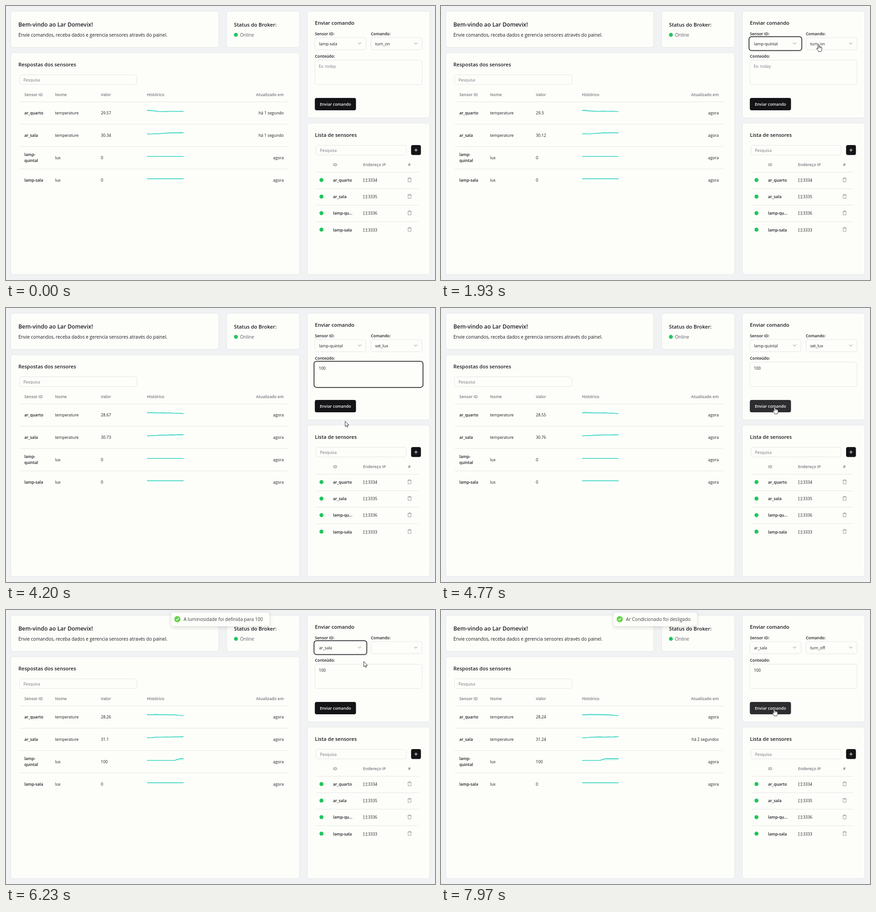
Recreate the animation shown at these times as an HTML page with a canvas. Size 936 by 599 pixels, loop 8000 ms.

```html
<!DOCTYPE html>
<html lang="pt-BR">
<head>
<meta charset="utf-8">
<title>Painel de sensores</title>
<style>
  html, body { margin: 0; width: 100%; height: 100%; overflow: hidden; background: #f0f2f3; }
  canvas { display: block; width: 936px; height: 599px; }
</style>
</head>
<body>
<canvas id="stage"></canvas>
<script>
const W = 936, H = 599, LOOP = 8000;
const canvas = document.getElementById('stage');
const ctx = canvas.getContext('2d');
const ratio = window.devicePixelRatio || 1;
canvas.width = W * ratio;
canvas.height = H * ratio;

const FONT = '"Open Sans", "Noto Sans", sans-serif';
const INK = '#1b1b1f', GRAY = '#74747c', LINE = '#e4e6e8', BLACK = '#141417';
const PAGE = '#f0f2f3', WHITE = '#fdfefa', GREEN = '#22c55e', TEAL = '#35d3c0';
const SMALL = 8.75, BODY = 10.05, TITLE = 11.05;

// Each stop: click time, pointer place, what the click changes in the form.
const START = { sensor: 'lamp-sala', command: 'turn_on', open: '', focus: '' };
const STOPS = [
  [750, 735, 86, { open: 'sensor' }],
  [1450, 722, 157, { open: '', sensor: 'lamp-quintal', focus: 'sensor' }],
  [2030, 823.5, 84, { open: 'command', focus: '' }],
  [2700, 835, 136, { open: '', command: 'set_lux', focus: 'command' }],
  [3200, 831, 175, {}],
  [3480, 800, 150, { focus: 'content' }],
  [4290, 740, 248, {}],
  [4550, 728, 216, { focus: '' }],
  [5400, 729, 79, { open: 'sensor' }],
  [6050, 728, 137, { open: '', sensor: 'ar_sala', command: '', focus: 'sensor' }],
  [6500, 840, 86, { open: 'command', focus: '' }],
  [7020, 853, 159, {}],
  [7280, 845, 179, { open: '', command: 'turn_off', focus: 'command' }],
  [7650, 727, 216, { focus: '' }]
];
const REST = 100, TRAVEL = 350;

const TOASTS = [
  { from: 4750, to: 6300, text: 'A luminosidade foi definida para 100' },
  { from: 7700, to: 9000, text: 'Ar Condicionado foi desligado' }
];

// Readings arrive every TICK ms and stop after LAST ticks.
const TICK = 415, LAST = 16, LUX_ON = 4970;
const QUARTO = [[0, 29.57], [4, 29.3], [7, 28.94], [10, 28.67], [13, 28.31], [LAST, 28.24]];
const SALA = [[0, 30.34], [4, 30.12], [7, 30.24], [10, 30.73], [13, 30.82], [LAST, 31.24]];

const clamp = v => Math.max(0, Math.min(1, v));
const ease = v => v * v * (3 - 2 * v);
const mix = (a, b, k) => a + (b - a) * k;
const bump = (u, center, width) => Math.exp(-(((u - center) / width) ** 2));
const tickAt = t => Math.min(LAST, Math.floor(t / TICK));

function reading(keys, n) {
  const i = Math.max(1, keys.findIndex(k => k[0] >= n));
  const [a, from] = keys[i - 1], [b, to] = keys[i];
  return +mix(from, to, (n - a) / (b - a)).toFixed(2);
}

// Sparkline heights for u from 0 to 1 across the chart, at progress p.
function quartoCurve(u, p) {
  const early = 230.4 - 2.8 * bump(u, 0, 0.2) + 0.5 * bump(u, 0.38, 0.1);
  const late = 228.3 + 3 * u ** 4 + 0.6 * (1 - u) ** 6;
  return mix(early, late, p) + 0.2 * Math.sin(u * 25 + p * 12);
}

function salaCurve(u, p) {
  const early = 279.6 - 2.8 * ease(clamp((u - 0.15) / 0.6));
  const late = 279.3 - 1.7 * ease(clamp(u / 0.4)) - u ** 6;
  return mix(early, late, p) + 0.2 * Math.sin(u * 25 + p * 12);
}

// Text is placed by the vertical middle of its capitals.
function text(str, x, cy, { size = SMALL, weight = 400, color = INK, align = 'left' } = {}) {
  ctx.font = `${weight} ${size}px ${FONT}`;
  ctx.fillStyle = color;
  ctx.textAlign = align;
  ctx.fillText(str, x, cy + size * 0.357);
}

const bold = (str, x, cy, opts) => text(str, x, cy, { weight: 600, ...opts });

function box(x1, y1, x2, y2, r, fill, stroke, width = 1) {
  ctx.beginPath();
  ctx.roundRect(x1, y1, x2 - x1, y2 - y1, r);
  if (fill) { ctx.fillStyle = fill; ctx.fill(); }
  if (stroke) { ctx.strokeStyle = stroke; ctx.lineWidth = width; ctx.stroke(); }
}

function field(x1, y1, x2, y2, focused) {
  box(x1, y1, x2, y2, 4, WHITE, LINE);
  if (focused) box(x1 - 2, y1 - 2, x2 + 2, y2 + 2, 5.5, null, BLACK, 1.5);
}

function shadowed(blur, dy, draw) {
  ctx.save();
  ctx.shadowColor = 'rgba(0,0,0,0.16)';
  ctx.shadowBlur = blur * ratio;
  ctx.shadowOffsetY = dy * ratio;
  draw();
  ctx.restore();
}

function lines(points, color, width) {
  ctx.beginPath();
  points.forEach(([x, y]) => ctx.lineTo(x, y));
  ctx.strokeStyle = color;
  ctx.lineWidth = width;
  ctx.lineJoin = ctx.lineCap = 'round';
  ctx.stroke();
}

function rule(x1, x2, y) {
  ctx.fillStyle = LINE;
  ctx.fillRect(x1, y - 0.5, x2 - x1, 1);
}

function dot(x, y, r, color) {
  ctx.beginPath();
  ctx.arc(x, y, r, 0, Math.PI * 2);
  ctx.fillStyle = color;
  ctx.fill();
}

const card = (x1, y1, x2, y2) => box(x1, y1, x2, y2, 5, WHITE, '#e3e7ea');

function spark(points) {
  const base = Math.max(...points.map(p => p[1]));
  ctx.save();
  ctx.beginPath();
  ctx.rect(307.5, base - 30, 80, 40);
  ctx.clip();
  ctx.beginPath();
  points.forEach(([x, y]) => ctx.lineTo(x, y));
  ctx.lineTo(388, base);
  ctx.lineTo(308, base);
  ctx.fillStyle = 'rgba(45,212,191,0.2)';
  ctx.fill();
  lines(points, TEAL, 1.6);
  ctx.restore();
}

function trend(curve, n) {
  spark(Array.from({ length: 16 }, (_, i) => [308 + i * 5.27, curve(i / 15, n / LAST)]));
}

function luxTrend(t, y) {
  const x = t < LUX_ON ? 400 : 387 - 5.27 * (Math.floor((t - LUX_ON) / 400) + 0.5);
  spark([[308, y], [x, y], [x + 4.5, y - 2], [x + 8, y - 2.3], [x + 11, y - 3.8], [x + 99, y - 3.8]]);
}

function ago(seconds) {
  return seconds < 1 ? 'agora' : seconds < 2 ? 'há 1 segundo' : `há ${Math.floor(seconds)} segundos`;
}

function drawResponses(t) {
  card(10.5, 102, 640.5, 587);
  bold('Respostas dos sensores', 27, 128, { size: TITLE });
  field(29.5, 150.5, 285.5, 171.5);
  text('Pesquisa', 38, 161.5, { color: GRAY });

  bold('Sensor ID', 40, 193.5, { color: GRAY });
  bold('Nome', 107, 193.5, { color: GRAY });
  bold('Valor', 207, 193.5, { color: GRAY });
  bold('Histórico', 307.5, 193.5, { color: GRAY });
  bold('Atualizado em', 606, 193.5, { color: GRAY, align: 'right' });

  const n = tickAt(t);
  const stale = t < 300 ? 1 : 0;
  const silent = Math.max(0, t - LAST * TICK) / 600;
  const rows = [
    [['ar_quarto'], 'temperature', reading(QUARTO, n), stale],
    [['ar_sala'], 'temperature', reading(SALA, n), stale || silent],
    [['lamp-', 'quintal'], 'lux', t >= LUX_ON ? 100 : 0, 0],
    [['lamp-sala'], 'lux', 0, 0]
  ];
  rows.forEach(([id, name, value, age], i) => {
    const y = 234 + i * 48.85;
    rule(29.5, 616, 209.5 + i * 48.85);
    id.forEach((part, k) => bold(part, 40, y + (k - (id.length - 1) / 2) * 13.3));
    text(name, 107, y);
    text(String(value), 207, y);
    text(ago(age), 606, y, { align: 'right' });
  });
  trend(quartoCurve, n);
  trend(salaCurve, n);
  luxTrend(t, 328.7);
  spark([[308, 377.6], [388, 377.6]]);
}

function trash(x, y) {
  const c = '#85858c';
  lines([[x - 4, y - 3], [x + 4, y - 3]], c, 0.8);
  lines([[x - 1.5, y - 3], [x - 1.5, y - 4.6], [x + 1.5, y - 4.6], [x + 1.5, y - 3]], c, 0.8);
  lines([[x - 3.2, y - 3], [x - 3.2, y + 4.5], [x + 3.2, y + 4.5], [x + 3.2, y - 3]], c, 0.8);
}

function drawSensorList() {
  card(657.5, 256, 924.5, 587);
  bold('Lista de sensores', 674, 282, { size: TITLE });
  field(676.5, 304.5, 873, 325.5);
  text('Pesquisa', 685, 315.5, { color: GRAY });
  box(883.8, 304, 905.3, 325.7, 4, BLACK);
  lines([[891, 315], [898, 315]], '#fff', 1);
  lines([[894.5, 311.5], [894.5, 318.5]], '#fff', 1);
  bold('ID', 713.5, 347, { color: GRAY });
  bold('Endereço IP', 779, 347, { color: GRAY });
  bold('#', 880, 347, { color: GRAY, align: 'center' });
  const rows = [['ar_quarto', 3334], ['ar_sala', 3335], ['lamp-qu...', 3336], ['lamp-sala', 3333]];
  rows.forEach(([id, port], i) => {
    const y = 381 + i * 36.15;
    rule(677, 900, 363.5 + i * 36);
    dot(688.3, y - 0.5, 4.4, GREEN);
    bold(id, 713.5, y);
    text('[:]:' + port, 779.5, y);
    trash(880.5, y - 1);
  });
}

function select(x, value, focused) {
  field(x, 69, x + 111.3, 95.6, focused);
  text(value, x + 9, 82.5);
  lines([[x + 94.5, 80.5], [x + 97.5, 83.5], [x + 100.5, 80.5]], '#77777d', 1);
}

function menu(x, items, current, pointer) {
  shadowed(5, 2, () => box(x, 98.5, x + 112.5, 190, 4, WHITE));
  box(x, 98.5, x + 112.5, 190, 4, WHITE, LINE);
  const step = 21.45, over = inside(pointer, x, 102, x + 112, 187);
  const hot = over ? Math.floor((pointer.y - 102) / step) : items.indexOf(current);
  items.forEach((item, i) => {
    const y = 112.5 + i * step;
    if (i === hot) box(x + 3.5, y - 10.5, x + 109.5, y + 10.5, 2.5, '#f3f4f4');
    text(item, x + 24.5, y);
    if (item === current) lines([[x + 10.5, y], [x + 13, y + 2.5], [x + 18, y - 2.7]], INK, 1.1);
  });
}

function drawForm(state, pointer) {
  card(657.5, 11.5, 924.5, 244.5);
  bold('Enviar comando', 674, 37, { size: TITLE });
  bold('Sensor ID:', 674, 60.5);
  bold('Comando:', 796, 60.5);
  bold('Conteúdo:', 674, 110);
  select(674, state.sensor, state.focus === 'sensor');
  select(796.5, state.command, state.focus === 'command');
  field(674, 118.4, 907.8, 171.7, state.focus === 'content');
  text(state.content || 'Ex: today', 682.5, 131.5, { color: state.content ? INK : GRAY });
  const hover = !state.open && onButton(pointer);
  box(673.8, 201, 763.6, 228, 4, hover ? '#2d2d30' : BLACK);
  bold('Enviar comando', 718.7, 214.7, { color: '#fafafa', align: 'center' });

  if (state.open === 'sensor') {
    menu(674, ['ar_quarto', 'ar_sala', 'lamp-quintal', 'lamp-sala'], state.sensor, pointer);
  } else if (state.open === 'command') {
    const setter = state.sensor.startsWith('lamp') ? 'set_lux' : 'set_temp';
    menu(796.5, ['not_found', setter, 'turn_on', 'turn_off'], state.command, pointer);
  }
}

function drawToast({ from, to, text: label }, t) {
  if (t < from || t > to + 160) return;
  const size = BODY + 0.1;
  const enter = 1 - (1 - clamp((t - from) / 170)) ** 3;
  const leave = ease(clamp((t - to) / 160));
  ctx.font = `400 ${size}px ${FONT}`;
  const w = ctx.measureText(label).width + 41, left = -w / 2, check = left + 13.5;
  const scale = mix(0.6, 1, enter) * mix(1, 0.6, leave);
  ctx.save();
  ctx.globalAlpha = mix(0.5, 1, enter) * (1 - leave);
  ctx.translate(467.5, 20.5 - 60 * (1 - enter) - 45 * leave);
  ctx.scale(scale, scale);
  shadowed(8, 2, () => box(left, -15, -left, 15, 5, WHITE));
  dot(check, -0.5, 6.7 * clamp((t - from - 40) / 100), '#61d345');
  if (t > from + 150) lines([[check - 2.8, -0.3], [check - 0.8, 1.9], [check + 2.9, -2.7]], '#fff', 1.4);
  text(label, left + 27, 0, { size, color: '#404044' });
  ctx.restore();
}

const inside = (p, x1, y1, x2, y2) => p.x >= x1 && p.x <= x2 && p.y >= y1 && p.y <= y2;
const onButton = p => inside(p, 674, 201, 763.5, 228);
const onSelect = p => inside(p, 674, 69, 785, 96) || inside(p, 796, 69, 908, 96);

// The pointer reaches each stop shortly before its click and rests there.
function pointerAt(t) {
  let x = 944, y = 330, free = 0;
  for (const [click, toX, toY] of STOPS) {
    const arrive = click - REST;
    const leave = Math.max(free, arrive - TRAVEL);
    const k = ease(clamp((t - leave) / (arrive - leave)));
    x = mix(x, toX, k);
    y = mix(y, toY, k);
    free = click + REST / 4;
  }
  return { x, y };
}

function stateAt(t) {
  const done = STOPS.filter(stop => stop[0] <= t).map(stop => stop[3]);
  const content = '100'.slice(0, Math.max(0, Math.floor((t - 3500) / 150)));
  return Object.assign({ content }, START, ...done);
}

const ARROW = new Path2D('M0 0V11.2L2.6 8.8L4.3 12.6L6 11.8L4.3 8.2H7.8Z');
const HAND = new Path2D('M-1.2 1.2Q-1.2 0 0 0T1.2 1.2V5Q2.6 4.4 3.5 5.4Q4.8 4.8 5.6 5.9Q7.4 5.6 7.4 7.4V10.5Q7.4 12.6 6 14.6V15.6H-0.2V14.4Q-2.3 12 -3.8 9.2Q-4.3 7.8 -3 7.7Q-2.2 7.8 -1.2 9.2Z');

function drawPointer(p, state) {
  ctx.save();
  ctx.translate(p.x, p.y);
  if (!state.open && inside(p, 674, 118, 908, 172)) {
    lines([[-2, -5.5], [2, -5.5]], INK, 1);
    lines([[0, -5.5], [0, 5.5]], INK, 1);
    lines([[-2, 5.5], [2, 5.5]], INK, 1);
  } else {
    const hand = !state.open && (onSelect(p) || onButton(p));
    const shape = hand ? HAND : ARROW;
    ctx.fillStyle = '#fff';
    ctx.strokeStyle = INK;
    ctx.lineWidth = 0.9;
    ctx.lineJoin = 'round';
    ctx.fill(shape);
    ctx.stroke(shape);
    if (hand) [1.2, 3.4, 5.5].forEach(x => lines([[x, 5.5], [x, 8]], INK, 0.7));
  }
  ctx.restore();
}

function render(t) {
  ctx.setTransform(ratio, 0, 0, ratio, 0, 0);
  ctx.fillStyle = PAGE;
  ctx.fillRect(0, 0, W, H);
  const state = stateAt(t), pointer = pointerAt(t);

  card(10.5, 11.5, 464, 90.5);
  bold('Bem-vindo ao Lar Domevix!', 27, 41, { size: 12.3 });
  text('Envie comandos, receba dados e gerencia sensores através do painel.', 27, 63.3, { size: BODY });
  card(481.5, 11.5, 640.5, 90.5);
  bold('Status do Broker:', 497.5, 41, { size: 11.2 });
  dot(501.6, 63, 4.3, GREEN);
  text('Online', 510.5, 63.3, { size: BODY, color: '#5c5c63' });

  drawResponses(t);
  drawSensorList();
  drawForm(state, pointer);
  TOASTS.forEach(toast => drawToast(toast, t));
  drawPointer(pointer, state);
}

const begin = performance.now();
function loop() {
  render((performance.now() - begin) % LOOP);
  requestAnimationFrame(loop);
}
loop();
</script>
</body>
</html>
```
